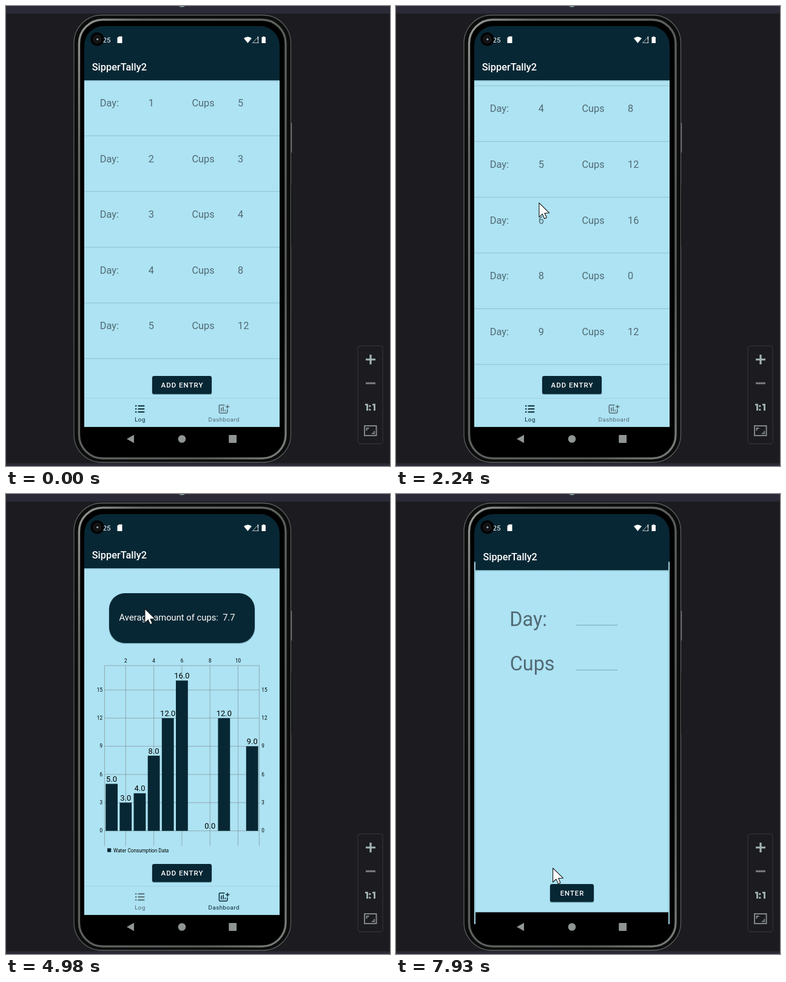
An HTML page that plays this animation: 633 by 756 pixels, repeating every 8000 ms.

```html
<!DOCTYPE html>
<html lang="en">
<head>
<meta charset="utf-8">
<title>Water log</title>
<style>
  html, body { margin: 0; width: 100%; height: 100%; overflow: hidden; background: #1b1b20; }
  svg { display: block; width: 633px; height: 756px; font-family: Roboto, "Noto Sans", sans-serif; }
  text { white-space: pre; }
  .dark { fill: #082734; }
  .sky { fill: #ade3f3; }
  .row { font-size: 16.4px; fill: #526a74; }
  .title { font-size: 16.4px; font-weight: 500; fill: #fff; }
  .btn { font-size: 11.5px; font-weight: 500; letter-spacing: 1px; fill: #fff; text-anchor: middle; }
  .tab { font-size: 9.8px; letter-spacing: .45px; text-anchor: middle; }
  .axis { font-size: 8.2px; }
  .value { font-size: 13px; text-anchor: middle; }
  .field { font-size: 32.8px; fill: #526a74; }
  .grid { stroke: #8a9ba1; stroke-width: .8; }
  .rule { stroke: #93c0ce; stroke-width: 1; }
  .blank { stroke: #7ba7b5; stroke-width: 1; }
</style>
</head>
<body>
<svg viewBox="0 0 633 756">
  <defs>
    <clipPath id="screen"><rect x="129" y="33" width="322" height="706" rx="32"/></clipPath>
    <clipPath id="listBox"><rect x="129" y="122" width="322" height="479.5"/></clipPath>
    <clipPath id="tabBox"><rect x="290" y="645" width="161" height="47"/></clipPath>
    <linearGradient id="shade" x2="0" y2="1">
      <stop stop-color="#082734" stop-opacity=".3"/>
      <stop offset="1" stop-color="#082734" stop-opacity="0"/>
    </linearGradient>
    <linearGradient id="rim" x2="1" y2="1">
      <stop stop-color="#969a94"/><stop offset=".15" stop-color="#646764"/>
      <stop offset=".8" stop-color="#565956"/><stop offset="1" stop-color="#7a7e79"/>
    </linearGradient>
  </defs>

  <!-- emulator window -->
  <rect width="633" height="756" fill="#1b1b20"/>
  <rect width="633" height="12.5" fill="#2a2b37"/>
  <rect y="751.5" width="633" height="5" fill="#2a2b37"/>
  <path d="M.5 12V752M632.5 12V752" stroke="#25262e"/>
  <circle cx="290" cy="-6" r="7" fill="none" stroke="#7f9c9c" stroke-width="1.8"/>

  <!-- phone body -->
  <rect x="469" y="192" width="2.2" height="49" rx="1" fill="#77797a"/>
  <rect x="469" y="293" width="2.2" height="101" rx="1" fill="#050505"/>
  <rect x="112" y="15" width="357.5" height="735" rx="46" fill="#0b0c0c" stroke="#5c5f5d" stroke-width="1.3"/>
  <rect x="120.5" y="22.5" width="340.5" height="721" rx="39" fill="#000" stroke="url(#rim)" stroke-width="3.4"/>

  <g clip-path="url(#screen)">
    <g id="main"></g>
    <g id="entry"></g>
  </g>

  <!-- status bar and camera -->
  <text x="159.6" y="60" font-size="11.5" fill="#fff">25</text>
  <path d="M186 50H191.5V61H183.5V52.5Z" fill="#fff"/>
  <path d="M392 53Q398.5 48 405 53L398.5 61Z" fill="#fff"/>
  <path d="M406.5 60.5H415.5V51Z" fill="none" stroke="#b4c0c5"/>
  <path d="M415.5 50V56M415.5 59V61" stroke="#fff" stroke-width="1.2"/>
  <path d="M423.5 50H426V51H428V61H421.5V51H423.5Z" fill="#fff"/>
  <circle cx="150.5" cy="54.5" r="11.2" fill="#040506"/>
  <circle cx="150.5" cy="54.5" r="6" fill="#0e1011" stroke="#2a2d2e"/>
  <circle cx="150.8" cy="54.8" r="1.7" fill="#9ba0a0"/>

  <!-- system keys -->
  <g fill="#8f9693">
    <path d="M199 711.5L211 704.8V718.2Z"/>
    <circle cx="290" cy="711.5" r="6.3"/>
    <rect x="367.3" y="705" width="12.8" height="13" rx="1"/>
  </g>

  <!-- zoom tools -->
  <rect x="580" y="558.5" width="41" height="161" rx="4.5" fill="none" stroke="#303239" stroke-width="1.3"/>
  <path d="M593 581H609M601 573V589" stroke="#a3b4b4" stroke-width="3.2"/>
  <path d="M593 620H609" stroke="#7c7d80" stroke-width="3"/>
  <path d="M592 655.2H595.5V665M604 655.2H607.5V665M599.8 656V659M599.8 662V665" fill="none" stroke="#a3b4b4" stroke-width="2.8"/>
  <path d="M591 690H610.5V706H591ZM594.5 698V694H598.5M603 702.5H607V698.5" fill="none" stroke="#7f8688" stroke-width="2"/>

  <!-- pointer -->
  <g id="pointer">
    <path d="M.6 .8V24L6 19L9.4 26.6L13 25L9.7 17.6L17.4 17.2Z" fill="#fff" stroke="#101214" stroke-width="1.1" stroke-linejoin="round"/>
    <circle id="press" r="18" fill="#e8ee40"/>
  </g>
</svg>

<script>
const LOOP = 8000, LAST_STEP = 7930, ROW = 91.6, LIST_END = 600.8, SCROLL = 345;
const $ = id => document.getElementById(id);
const entries = [[1, 5], [2, 3], [3, 4], [4, 8], [5, 12], [6, 16], [8, 0], [9, 12], [11, 9]];

const text = (cls, x, y, s, extra = '') => `<text class="${cls}" x="${x}" y="${y}" ${extra}>${s}</text>`;
const rect = (cls, x, y, w, h, r = 0, extra = '') =>
  `<rect class="${cls}" x="${x}" y="${y}" width="${w}" height="${h}" rx="${r}" ${extra}/>`;
const line = (cls, x1, y1, x2, y2) => `<line class="${cls}" x1="${x1}" y1="${y1}" x2="${x2}" y2="${y2}"/>`;

const raised = (x, y, w, h, r) =>
  rect('dark', x - .5, y + 1.3, w + 1, h, r, 'opacity=".25"') + rect('dark', x, y, w, h, r);

const button = (x, y, w, h, s) =>
  raised(x, y, w, h, 3) + text('btn', x + w / 2 + .5, y + h / 2 + 4.1, s);

// App bar, page background and the black strip under the page.
const page = () =>
  rect('sky', 129, 122, 322, 570) +
  rect('', 129, 122, 322, 2.5, 0, 'fill="url(#shade)"') +
  rect('dark', 129, 33, 322, 89) +
  rect('', 129, 691.6, 322, 55) +
  text('title', 141.7, 106, 'SipperTally2');

function list() {
  const rows = entries.map(([day, cups], i) => {
    const y = 165 + ROW * i, end = y + 48.2;
    return text('row', 154.8, y, 'Day:') + text('row', 234.8, y, day) +
      text('row', 306.4, y, 'Cups') + text('row', 382, y, cups) + line('rule', 129, end, 451, end);
  });
  return `<g id="list" clip-path="url(#listBox)"><g id="rows">${rows.join('')}</g></g>`;
}

function dashboard() {
  const px = v => 150.97 + 23.16 * v, py = v => 553.6 - 15.44 * v;
  let s = raised(170, 163, 240, 82, 26) +
    text('', 186.6, 208, 'Average amount of cups:  7.7', 'font-size="14.76" fill="#fff"');
  for (let v = 2; v <= 10; v += 2)
    s += line('grid', px(v), 282, px(v), 578.5) + text('axis', px(v), 277, v, 'text-anchor="middle"');
  for (let v = 0; v <= 15; v += 3)
    s += line('grid', 162.5, py(v), 417.5, py(v)) +
      text('axis', 159, py(v) + 2.8, v, 'text-anchor="end"') + text('axis', 421.3, py(v) + 2.8, v);
  s += line('grid', 162.5, 282, 162.5, 578.5) + line('grid', 417.5, 282, 417.5, 578.5) +
    line('grid', 162.5, 282, 417.5, 282);
  for (const [day, cups] of entries)
    s += rect('dark', px(day) - 9.9, py(cups), 19.8, 15.44 * cups) +
      text('value', px(day), py(cups) - 3.4, cups.toFixed(1));
  s += rect('dark', 167, 582.3, 6.2, 6.2) + text('axis', 177, 588.5, 'Water Consumption Data');
  return `<g id="dash">${s}</g>`;
}

const tabs = () =>
  rect('', 129, 644, 322, 1.5, 0, 'fill="#082734" opacity=".07"') + rect('sky', 129, 645.5, 322, 46.1) +
  `<g clip-path="url(#tabBox)"><circle id="tabRipple" cx="372" cy="662" fill="#082734"/></g>
   <g id="logTab"><path d="M213 657.2H215.4M213 662.2H215.4M213 667.2H215.4M217.5 657.2H228.3M217.5 662.2H228.3M217.5 667.2H228.3"
     stroke="currentColor" stroke-width="1.9"/>${text('tab', 221, 683, 'Log', 'fill="currentColor"')}</g>
   <g id="dashTab"><path d="M360.5 655.8H352.8Q351.4 655.8 351.4 657.2V667.6Q351.4 669 352.8 669H363.4Q364.8 669 364.8 667.6V663M355 660V666.2M358.2 658.6V666.2M361.4 663.4V666.2M362 658.6H368.4M365.2 655.4V661.8"
     fill="none" stroke="currentColor" stroke-width="1.5"/>${text('tab', 359.3, 683, 'Dashboard', 'fill="currentColor"')}</g>`;

$('main').innerHTML = page() + list() + dashboard() + button(241, 608, 98, 29.8, 'ADD ENTRY') +
  rect('', 241, 608, 98, 29.8, 3, 'id="flash" fill="#fff"') + tabs();

$('entry').innerHTML = rect('', 129, 33, 322, 714, 0, 'fill="none" stroke="#082734" stroke-opacity=".4"') + page() +
  text('field', 186, 215.4, 'Day:') + line('blank', 297, 213.6, 366, 213.6) +
  text('field', 186.4, 289.4, 'Cups') + line('blank', 297, 288.4, 366, 288.4) +
  button(253.5, 644.7, 73, 29.8, 'ENTER');

// Pointer strokes: start, end, and points passed at even intervals.
const strokes = [
  [300, 1310, [[470, 756], [360, 690], [278, 667], [230, 664]]],
  [1640, 1830, [[230, 664], [220, 540], [282, 473]]],
  [1830, 2300, [[282, 473], [231, 309]]],
  [2600, 3320, [[231, 309], [295, 480], [376, 660]]],
  [4250, 4980, [[376, 660], [410, 500], [300, 270], [174, 215], [228, 188]]],
  [4980, 5890, [[228, 188], [340, 115], [385, 175], [196, 255], [350, 445], [274, 494]]],
  [6070, 6190, [[274, 494], [209, 599]]],
  [6190, 6930, [[209, 599], [184, 650], [236, 664], [258, 614]]]
];
const presses = [[1890, 2090], [3590, 3720], [7360, 7490]];

const ramp = (t, from, to) => Math.min(1, Math.max(0, (t - from) / (to - from)));
const smooth = u => u * u * (3 - 2 * u);

// Catmull-Rom curve through evenly timed points.
function along(points, u) {
  const n = points.length - 1, i = Math.min(n - 1, Math.floor(u * n)), f = u * n - i;
  const at = j => points[Math.min(n, Math.max(0, j))];
  return [0, 1].map(k => {
    const [a, b, c, d] = [-1, 0, 1, 2].map(j => at(i + j)[k]);
    return b + f / 2 * (c - a + f * (2 * a - 5 * b + 4 * c - d + f * (3 * (b - c) + d - a)));
  });
}

function pointerAt(t) {
  const [from, to, points] = strokes.findLast(s => s[0] <= t) || strokes[0];
  return along(points, ramp(t, from, to));
}

// Overscroll: a quick pull, then a slow release.
function stretchAt(t) {
  const v = Math.max(0, (t - 2370) / 90);
  return .017 * v * Math.exp(1 - v);
}

const zoom = k => `translate(290 362) scale(${k}) translate(-290 -362)`;
const tint = u => `color-mix(in srgb, #082734 ${u * 100}%, #566b73)`;
const show = (id, a) => { $(id).style.opacity = a; $(id).style.display = a > 0 ? '' : 'none'; };

function draw(t) {
  $('pointer').setAttribute('transform', `translate(${pointerAt(t)})`);
  show('pointer', t >= 300 ? 1 : 0);
  show('press', presses.some(([a, b]) => t >= a && t < b) ? .7 : 0);

  const scroll = SCROLL * smooth(ramp(t, 1890, 2400));
  $('rows').setAttribute('transform',
    `translate(0 ${LIST_END}) scale(1 ${1 + stretchAt(t)}) translate(0 ${-LIST_END - scroll})`);

  const swap = ramp(t, 3760, 3960), tab = ramp(t, 3730, 3850);
  show('list', 1 - swap);
  show('dash', swap);
  $('logTab').style.color = tint(1 - tab);
  $('dashTab').style.color = tint(tab);
  $('tabRipple').setAttribute('r', 15 + 65 * ramp(t, 3690, 3920));
  show('tabRipple', t > 3690 ? .12 * (1 - ramp(t, 3880, 4080)) : 0);
  show('flash', .22 * ramp(t, 7400, 7520) * (1 - ramp(t, 7600, 7800)));

  const open = Math.max(0, t - 7770), k = 1 - Math.exp(-open / 65);
  $('main').setAttribute('transform', zoom(1 + .05 * k));
  $('entry').setAttribute('transform', zoom(.85 + .15 * k));
  show('entry', ramp(open, 35, 85));
}

const start = performance.now();
function tick() {
  draw(Math.min((performance.now() - start) % LOOP, LAST_STEP));
  requestAnimationFrame(tick);
}
tick();
</script>
</body>
</html>
```
